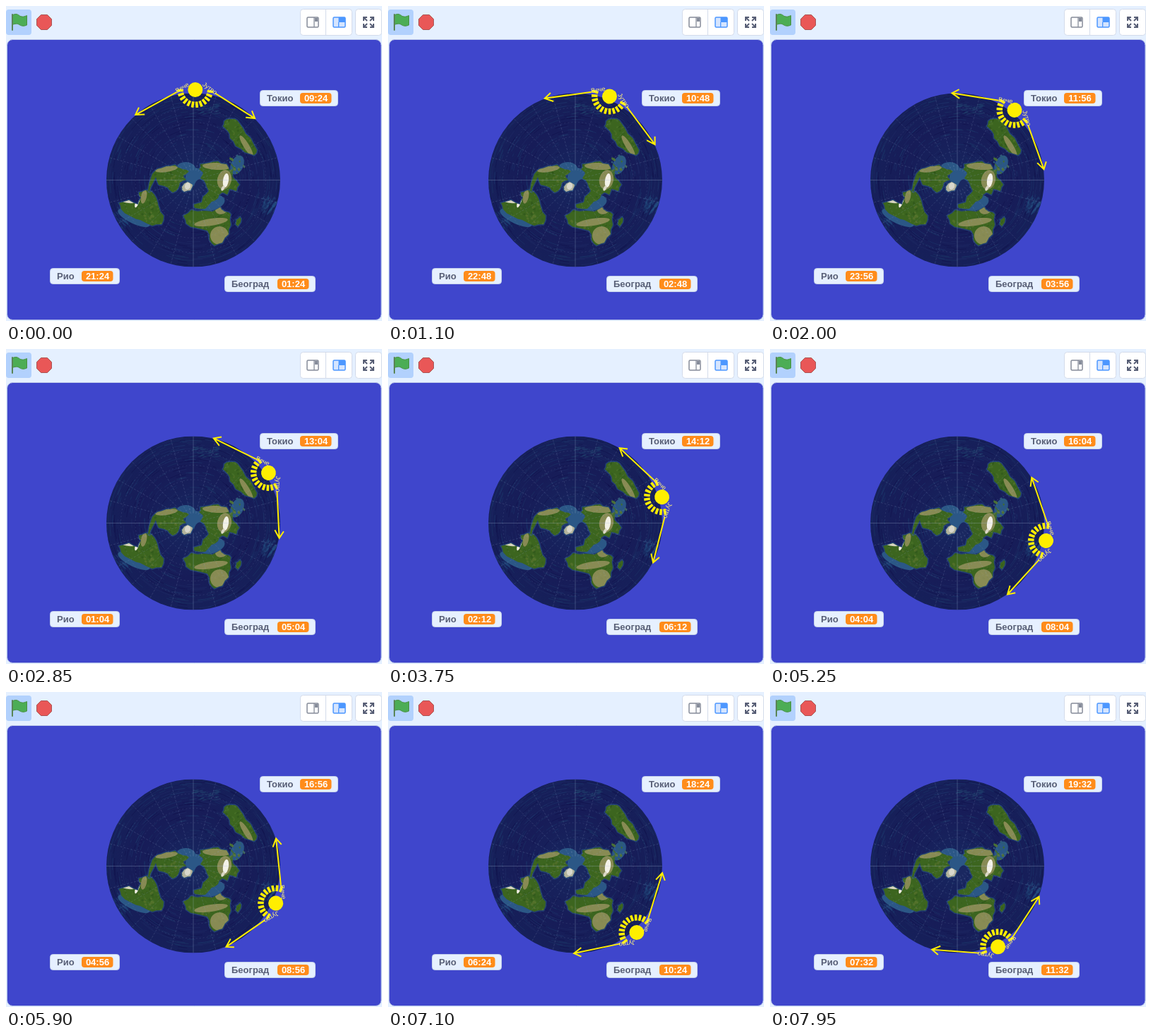
Animation, 532 px wide and 446 px high, one loop 8000 ms. Source, as an HTML page with a canvas:

```html
<!DOCTYPE html>
<html lang="sr">
<head>
<meta charset="utf-8">
<title>Време</title>
<style>
html, body { margin: 0; width: 100%; height: 100%; overflow: hidden; background: #e5f0ff; }
#stage { position: relative; width: 532px; height: 446px; overflow: hidden; }
canvas, svg { position: absolute; left: 0; top: 0; }
text { font-family: "Liberation Sans", Arial, sans-serif; }
.monitor { font-size: 13px; font-weight: bold; }
.part { font-size: 9px; fill: #fff27a; text-anchor: middle; }
</style>
</head>
<body>
<div id="stage">
  <canvas width="532" height="446"></canvas>
  <svg width="532" height="446" viewBox="0 0 532 446">
    <rect y="5" width="36" height="36" rx="4" fill="#b2d1fd"/>
    <path d="M9 13C14 10 17 12 19.500 14C23 16 26 15 29.500 13.500V27C25 29 22 28.500 19 26.500C16 24.500 13 25 9 26.500Z" fill="#4cad55" stroke="#4a9141"/>
    <path d="M9 12V34" stroke="#5a8555" stroke-width="2" stroke-linecap="round"/>
    <path d="M49.500 12.500h9l6 6v9l-6 6h-9l-6-6v-9z" fill="#e95757" stroke="#a95555"/>

    <g fill="#fff" stroke="#d3dbea">
      <rect x="416.500" y="4.500" width="73" height="37" rx="4"/>
      <rect x="494.500" y="4.500" width="37" height="37" rx="4"/>
      <path d="M452.500 5V41"/>
    </g>
    <rect x="426" y="16" width="16" height="14" rx="1.500" fill="#fff" stroke="#858b99" stroke-width="1.500"/>
    <path d="M436 16V30" stroke="#858b99" stroke-width="1.300"/>
    <path d="M437 17h4v5h-4z" fill="#858b99"/>
    <rect x="463" y="16" width="17" height="14" rx="1.500" fill="#d5e5ff" stroke="#4c97ff" stroke-width="1.500"/>
    <path d="M470.500 16H480V23H470.500zM470 23h1.300v7h-1.300z" fill="#4c97ff"/>
    <g id="expand" fill="none" stroke="#575e75" stroke-width="2"></g>

    <g id="sun" fill="none" stroke="#ffee00" stroke-width="2">
      <g id="rays" stroke-width="3.600"></g>
      <circle cx="-1" cy="-128" r="10.500" fill="#ffee00" stroke="none"/>
      <path d="M-27 -124L-84.500 -90M-80 -100.500L-84.500 -90L-71.500 -91"/>
      <path d="M27 -124L84.500 -90M80 -100.500L84.500 -90L71.500 -91"/>
      <g stroke="none">
        <text class="part" transform="translate(-18 -128) rotate(-32)">Вече</text>
        <text class="part" transform="translate(18 -128) rotate(34)">Јутро</text>
      </g>
    </g>
    <g id="monitors"></g>
  </svg>
</div>
<script>
const $ = id => document.getElementById(id);
const CX = 265, CY = 246.5, R = 123;

// ---- static picture ----
const ctx = document.querySelector('canvas').getContext('2d');
let seed = 7;
const rand = () => (seed = seed * 16807 % 2147483647) / 2147483647;
const between = (a, b) => a + (b - a) * rand();
const pick = list => list[Math.floor(rand() * list.length)];

function pathOf(str) {
  const n = str.split(' ').map(p => p.split(',').map(Number));
  const p = new Path2D();
  n.forEach(([x, y], i) => {
    if (i) p.lineTo(x, y); else p.moveTo(x, y);
    // A small ragged step along each coast
    const [u, v] = n[(i + 1) % n.length];
    p.lineTo((x + u) / 2 + between(-1.5, 1.5), (y + v) / 2 + between(-1.5, 1.5));
  });
  p.closePath();
  return p;
}

function blob(x, y, rx, ry, turn, color) {
  ctx.beginPath();
  ctx.ellipse(x, y, rx, ry, turn, 0, 7);
  ctx.fillStyle = color;
  ctx.fill();
}

function drawOcean() {
  const sea = ctx.createRadialGradient(CX, CY, 10, CX, CY, R);
  sea.addColorStop(0, '#17265f');
  sea.addColorStop(.6, '#171c58');
  sea.addColorStop(1, '#16205a');
  ctx.fillStyle = sea;
  ctx.fillRect(CX - R, CY - R, 2 * R, 2 * R);
  ctx.lineWidth = 1;
  for (let i = 0; i < 620; i++) {
    const a = between(0, 6.28), r = R * Math.sqrt(rand());
    ctx.beginPath();
    ctx.arc(CX, CY, r, a, a + between(.04, .28));
    ctx.strokeStyle = pick(['#1e4a7855', '#22527a44', '#100f4a88', '#24346d66']);
    ctx.stroke();
  }
  for (let i = 0; i < 45; i++) {
    blob(between(264, 300), between(138, 153), between(1, 6), .7, -.2, '#2c648044');
    blob(between(148, 176), between(288, 318), between(1, 6), 1, .8, '#275b8a44');
    blob(between(364, 384), between(270, 294), between(1, 5), 1, -1, '#275b8a55');
  }
}

function drawGrid() {
  ctx.lineWidth = .7;
  for (let i = 0; i < 24; i++) {
    const a = i * Math.PI / 12, main = i % 6 === 0;
    ctx.setLineDash(main ? [] : [3, 2]);
    ctx.strokeStyle = main ? '#a9bad766' : '#94a6cc48';
    ctx.beginPath();
    ctx.moveTo(CX + 14 * Math.cos(a), CY + 14 * Math.sin(a));
    ctx.lineTo(CX + R * Math.cos(a), CY + R * Math.sin(a));
    ctx.stroke();
  }
  ctx.setLineDash([2, 3]);
  ctx.strokeStyle = '#8ba2c83c';
  for (let r = 20.5; r < R; r += 20.5) {
    ctx.beginPath();
    ctx.arc(CX, CY, r, 0, 7);
    ctx.stroke();
  }
  ctx.setLineDash([]);
}

const lands = [
  '309,163 319,160 327,162 335,173 346,187 355,204 351,211 338,207 325,198 317,187 314,177 307,170',
  '160,279 174,275 187,281 191,271 188,264 197,261 206,263 212,271 216,284 223,297 220,309 207,311 190,303 175,297 163,288',
  '207,238 214,231 227,227 239,225 250,231 259,234 251,240 255,246 246,250 243,259 236,264 229,257 216,253 212,242 207,252 203,263 201,261',
  '275,224 288,222 300,220 312,224 316,233 321,243 330,253 326,262 316,259 313,267 306,264 300,272 291,277 282,287 268,286 266,281 277,278 279,270 287,262 282,250 275,244 279,236 273,231',
  '251,297 262,289 278,290 292,291 303,285 309,291 318,295 318,310 315,323 306,335 295,339 288,331 285,318 269,314 255,308',
  '249,256 257,249 264,253 261,261 252,263',
  '326,303 331,299 332,306 328,312 325,309'
];

function drawLand() {
  const shelf = '#2b5786';
  blob(267, 242, 13, 13, 0, shelf);
  blob(255, 229, 13, 8, .1, shelf);
  blob(327, 225, 9, 14, .4, shelf);
  blob(292, 279, 18, 10, -.3, shelf);
  blob(181, 300, 25, 8, .45, shelf);
  blob(272, 259, 7, 14, .2, '#1a2860');
  lands.forEach((str, k) => {
    const shape = pathOf(str);
    ctx.strokeStyle = '#2b578699';
    ctx.lineWidth = 3;
    ctx.stroke(shape);
    ctx.fillStyle = k === 5 ? '#b4b49c' : '#3c651f';
    ctx.fill(shape);
    ctx.save();
    ctx.clip(shape);
    const [x, y] = str.split(' ')[0].split(',').map(Number);
    for (let i = 0; i < 260; i++)
      blob(x + between(-14, 76), y + between(-44, 52), between(.6, 3), between(.5, 2), rand() * 3,
        pick(['#274d1866', '#52782d66', '#79843d55', '#345d1c77']));
    const tan = (...b) => blob(...b, '#aa9d6cb0');
    tan(340, 198, 4, 17, -.55);
    tan(227, 231, 16, 4, -.15);
    tan(298, 227, 20, 5, .05);
    tan(309, 246, 10, 14, .2);
    tan(302, 325, 13, 13, .3);
    tan(290, 306, 24, 5, -.15);
    tan(304, 289, 8, 6, 0);
    tan(195, 270, 4, 10, .2);
    blob(311, 247, 4, 10, .15, '#f3f1e8');
    blob(307, 258, 2, 4, .5, '#ddd9c6');
    blob(186, 277, 2.5, 9, .35, '#f1eee4');
    blob(174, 277, 10, 2, .1, '#d8d5c1');
    blob(257, 255, 4, 5, .3, '#d9d8cc');
    ctx.restore();
  });
  for (let i = 0; i < 24; i++)
    blob(between(317, 337), between(211, 237), between(.8, 3), between(.6, 1.8), 1, pick(['#426b2c', '#50713a', '#2d5c78']));
}

ctx.beginPath();
ctx.roundRect(1.5, 47.5, 529.5, 397, 8);
ctx.fillStyle = '#3f46cc';
ctx.strokeStyle = '#bfcbea';
ctx.fill();
ctx.stroke();
ctx.save();
ctx.beginPath();
ctx.arc(CX, CY, R, 0, 7);
ctx.clip();
drawOcean();
drawLand();
drawGrid();
ctx.restore();

$('expand').innerHTML = [0, 90, 180, 270].map(a =>
  `<path transform="translate(513 23) rotate(${a})" d="M2 -2L6 -6M2 -7H7V-2"/>`).join('');
$('rays').innerHTML = Array.from({ length: 12 }, (_, i) =>
  `<path transform="translate(-1 -128) rotate(${5 + i * 15.5})" d="M17 0H25.500"/>`).join('');

// ---- clocks ----
const clocks = [
  { name: 'Токио', x: 359, y: 119, w: 111, start: 564 },
  { name: 'Рио', x: 62, y: 371, w: 99, start: 1284 },
  { name: 'Београд', x: 309, y: 382, w: 129, start: 84 }
];
$('monitors').innerHTML = clocks.map(c => `<g class="monitor" transform="translate(${c.x} ${c.y})">
  <rect x=".5" y=".5" width="${c.w - 1}" height="22" rx="4" fill="#e6f0ff" stroke="#c4d0ea"/>
  <text x="10" y="16" fill="#575e75">${c.name}</text>
  <rect x="${c.w - 54}" y="4" width="44.500" height="15" rx="4" fill="#ff8c1a"/>
  <text class="value" x="${c.w - 31.5}" y="16" fill="#fff" text-anchor="middle"></text></g>`).join('');
const values = document.querySelectorAll('.value');
const two = n => String(n).padStart(2, '0');

// ---- motion: one degree and four minutes per tick ----
function draw(now) {
  const step = Math.floor((now % 8000) / 50 + 1e-6);
  const degrees = Math.floor(step * .956 + .51) + 1.7;
  const minutes = 4 * Math.floor(step * .952 + .78);
  $('sun').setAttribute('transform', `translate(${CX} ${CY}) rotate(${degrees})`);
  clocks.forEach((c, i) => {
    const m = (c.start + minutes) % 1440;
    values[i].textContent = two(Math.floor(m / 60)) + ':' + two(m % 60);
  });
}

let origin = null;
function tick(now) {
  if (origin === null) origin = now;
  draw(Math.max(0, now - origin));
  requestAnimationFrame(tick);
}
draw(0);
requestAnimationFrame(tick);
</script>
</body>
</html>
```
